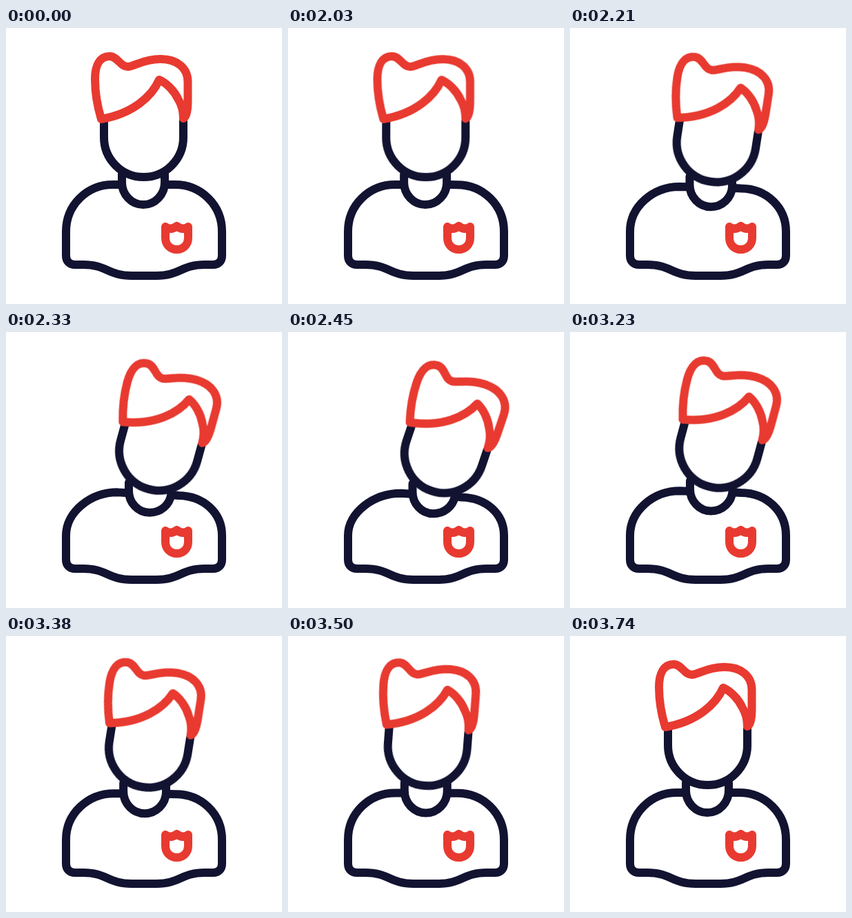
Recreate the animation shown at these times as an HTML page. Size 400 px wide and 400 px high, loop 3770 ms.

```html
<!DOCTYPE html>
<html lang="en">
<head>
<meta charset="utf-8">
<title>Tilting head</title>
<style>
  html, body { margin: 0; width: 100%; height: 100%; overflow: hidden; background: #fff; }
  svg { display: block; width: 100vw; height: 100vh; }
  path { fill: none; stroke: #121331; stroke-width: 12; stroke-linecap: round; stroke-linejoin: round; }
  .red { stroke: #e83a30; }

  .body, .neck, .shift, .tilt { animation: 3770ms linear infinite; }
  .body { animation-name: body; }
  .neck { animation-name: neck; }
  .shift { animation-name: shift; }
  .tilt { animation-name: tilt; transform-origin: 178px 210px; }

  /* out from 2000 ms, back from 3000 to 3740 ms */
  @keyframes body {
    0%, 53.05%, 99.2%, 100% {
      d: path("M166 227 L155 227 C117 227 87 257 87 295 L87 330 C87 338 92 343 100 343 L112 343 C146 343 148 359 182 359 L218 359 C252 359 254 343 288 343 L300 343 C308 343 313 338 313 330 L313 295 C313 257 283 227 245 227 L234 227");
      animation-timing-function: cubic-bezier(.333, 0, .5, 1);
    }
    67.37%, 79.58% {
      d: path("M180 235 L164 234 C124 234 87 262 87 295 L87 330 C87 338 92 343 100 343 L112 343 C146 343 148 359 182 359 L218 359 C252 359 254 343 288 343 L300 343 C308 343 313 338 313 330 L313 295 C313 263 287 241 252 240 L243 239");
      animation-timing-function: cubic-bezier(.3, 0, .15, 1);
    }
  }
  @keyframes neck {
    0%, 53.05%, 99.2%, 100% {
      d: path("M168 212 L168 224 C168 241.5 182 256 199 256 C216 256 230 241.5 230 224 L230 212");
      animation-timing-function: cubic-bezier(.333, 0, .5, 1);
    }
    67.37%, 79.58% {
      d: path("M181 220 L181 232 C181 249 194 263.5 211 263.5 C227 263.5 239 253 242 240 L242 239");
      animation-timing-function: cubic-bezier(.3, 0, .15, 1);
    }
  }
  /* the head swings a little past its rest place on the way back */
  @keyframes shift {
    0%, 53.05%, 99.2%, 100% {
      transform: translate(0, 0);
      animation-timing-function: cubic-bezier(.333, 0, .5, 1);
    }
    67.37%, 79.58% {
      transform: translate(12px, 8px);
      animation-timing-function: cubic-bezier(.333, 0, .5, 1);
    }
    91.51% {
      transform: translate(-1.2px, -.8px);
      animation-timing-function: ease-in-out;
    }
  }
  @keyframes tilt {
    0%, 53.05%, 99.2%, 100% {
      transform: rotate(0deg);
      animation-timing-function: cubic-bezier(.333, 0, .3, 1);
    }
    69.76%, 79.58% {
      transform: rotate(20deg);
      animation-timing-function: cubic-bezier(.333, 0, .62, 1);
    }
  }
</style>
</head>
<body>
<svg viewBox="0 0 400 400">
  <path class="body"/>
  <path class="neck"/>
  <path class="red" d="M231 288 V304 C231 314 238 321 247.5 321 C257 321 264 314 264 304 V288 Q256 294 247.5 287 Q239 294 231 288 Z"/>
  <g class="shift">
    <g class="tilt">
      <path d="M142 135 V158.5 A57.5 57.5 0 0 0 257 158.5 V135"/>
      <path class="red" d="M138 132 C132 112 129 92 129 74 C129 54 136 41 150 41 C162 41 166 57 177 56 C186 55.5 199 45 224 45 C248 45 263.5 58 263.5 78 V106 C263.5 118 262 129 257 131 C257 124 256 114 250 104 C244 91 233 80 222 75 C212 98 185 124 138 132 Z"/>
    </g>
  </g>
</svg>
</body>
</html>
```
